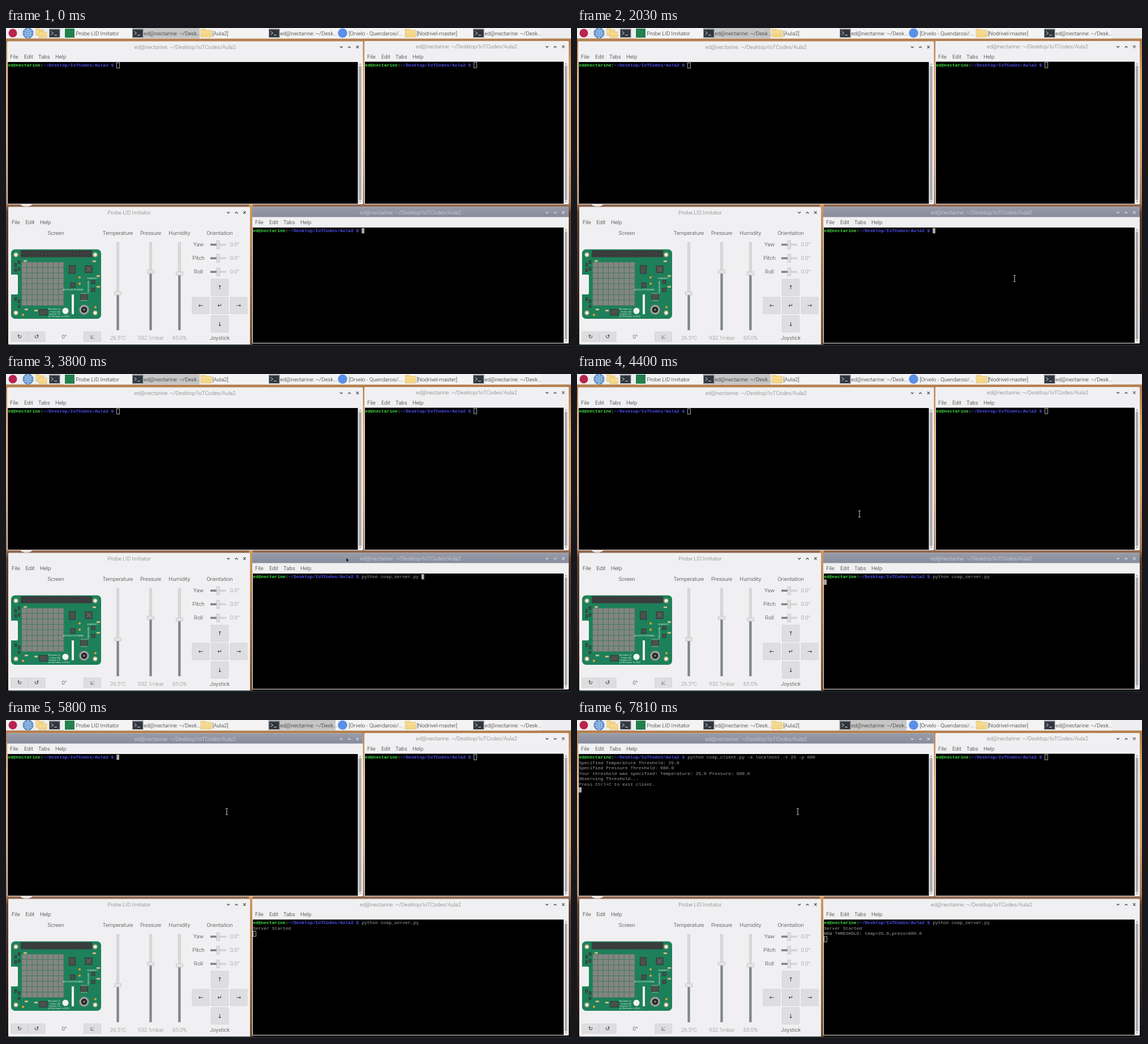
Animation, 998 px wide and 561 px high, one loop 8 s. Source, as an HTML page:

```html
<!DOCTYPE html>
<html lang="en">
<head>
<meta charset="utf-8">
<title>Terminal session</title>
<style>
  html, body { margin: 0; width: 100%; height: 100%; overflow: hidden; background: #1a1210; }
  svg { display: block; width: 998px; height: 561px; }
  text { white-space: pre; font: 300 9.6px Roboto, sans-serif; fill: #222; }
  text.mono { font: 8px "Liberation Mono", monospace; fill: #a0a0a0; }
  text.bold { font-weight: bold; }
  text.arrow { font: 10px "DejaVu Sans", sans-serif; }
  text.print { font: 4px "Liberation Sans", sans-serif; fill: #e6f2ea; }
</style>
</head>
<body>
<svg id="stage" viewBox="0 0 998 561" xmlns="http://www.w3.org/2000/svg"></svg>
<script>
const LOOP = 8000, CHAR = 4.8, LINE = 9.6, PANEL = '#f0f0f2';
const USER = 'ed@nectarine', PATH = '~/Desktop/IoTCodes/Aula2';
const TITLE = `${USER}: ${PATH}`, APP = 'Probe LID Imitator';
const PROMPT_LENGTH = USER.length + PATH.length + 4;

const rect = (x, y, w, h, fill, extra = '') =>
  `<rect x="${x}" y="${y}" width="${w}" height="${h}" fill="${fill}" ${extra}/>`;
const circle = (x, y, r, fill, extra = '') =>
  `<circle cx="${x}" cy="${y}" r="${r}" fill="${fill}" ${extra}/>`;
const path = (d, stroke, width = 1, fill = 'none') =>
  `<path d="${d}" stroke="${stroke}" stroke-width="${width}" fill="${fill}"/>`;
const text = (x, y, s, extra = '') => `<text x="${x}" y="${y}" ${extra}>${s}</text>`;
const label = (x, y, s, fill = '#333', extra = '') =>
  text(x, y, s, `text-anchor="middle" style="fill:${fill}" ${extra}`);
const repeat = (n, f) => Array.from({ length: n }, (_, i) => f(i)).join('');

// ---- Desktop and taskbar ----
const terminalIcon = x =>
  rect(x, 1, 19.5, 16, '#8b8f94') + rect(x + 1, 3, 17.5, 13, '#30363e') +
  path(`M${x + 3.5} 6l4 3-4 3M${x + 9} 12.5h5`, '#d5d9dd');
const folder = (x, y = 2, w = 19, h = 14) =>
  path(`M${x} ${y}h${w * .4}l2 2h${w * .6 - 2}v${h - 2}h${-w}z`, '#dfbd68', .7, '#f3d688') +
  path(`M${x} ${y + 5}h${w}`, '#fae9b5');

const tasks = [
  [103, APP, () => rect(104, 1, 17, 16, '#23804f')],
  [223, `${USER}: ~/Desk...`, terminalIcon],
  [344, '[Aula2]', folder],
  [464, `${USER}: ~/Desk...`, terminalIcon],
  [585, '[Orvelo - Quendarosi/...', () => circle(594.5, 9, 8.3, '#5b8fe8')],
  [705, '[Nodrivel-master]', folder],
  [825, `${USER}: ~/Desk...`, terminalIcon],
];

const taskbar = active =>
  rect(0, 0, 998, 18.5, '#eeeef0') + rect(102, 0, 843, 18.5, '#f3f3f3') +
  rect(active, 0, 119, 18.5, '#c6c6c6') +
  circle(12, 9, 7.5, '#b8244e') +
  circle(39, 9, 9, '#5f93cf', 'stroke="#3d6fae"') +
  path('M30 9h18M39 0v18M32 4q7 4 14 0M32 14q7-4 14 0M39 0q-9 9 0 18M39 0q9 9 0 18', '#c5dcf2', .8) +
  folder(53, 1, 14, 12) + folder(58, 5, 14, 12) + terminalIcon(76) +
  tasks.map(([x, name, icon]) => icon(x) + text(x + 20.3, 12.6, name)).join('');

const desktop = `
  <defs>
    <linearGradient id="sky" x2="0" y2="1">
      <stop offset="0" stop-color="#a9764a"/><stop offset=".18" stop-color="#e5a765"/>
      <stop offset=".38" stop-color="#dba069"/><stop offset=".55" stop-color="#a5785c"/>
      <stop offset=".58" stop-color="#5d4130"/><stop offset="1" stop-color="#17110f"/>
    </linearGradient>
    <linearGradient id="reflection" x2="0" y2="1">
      <stop offset="0" stop-color="#d19a60"/><stop offset="1" stop-color="#6d4c30"/>
    </linearGradient>
    <linearGradient id="active" x2="0" y2="1">
      <stop offset="0" stop-color="#999caa"/><stop offset="1" stop-color="#878b9b"/>
    </linearGradient>
  </defs>` +
  rect(0, 0, 998, 561, 'url(#sky)') +
  rect(429, 311, 7, 248, 'url(#reflection)') +
  '<ellipse cx="36" cy="311" rx="10" ry="4" fill="#e8e0da"/>' +
  rect(0, 560, 998, 1, '#12404a');

// ---- Windows ----
function windowFrame({ x, y, w, h, title, menu }, active) {
  const right = x + w, mid = y + 10, ink = active ? '#e2e3e8' : '#333';
  const b = right - 38.3, c = right - 24, d = right - 9.7;
  return rect(x, y, w, h, PANEL, 'rx="1.5"') +
    (active ? rect(x, y, w, 18, 'url(#active)') : '') +
    label(x + w / 2, y + 13.3, title, active ? '#dddee4' : '#777') +
    path(`M${b - 2.3} ${mid - 1}l2.3 2.3 2.3-2.3M${c - 2.3} ${mid + 1.5}l2.3-2.3 2.3 2.3` +
      `M${d - 2.1} ${mid - 2.1}l4.2 4.2m0-4.2l-4.2 4.2`, ink, 1.1) +
    menu.map(([dx, s]) => text(x + dx, y + 30.5, s)).join('');
}

const terminalMenu = [[5, 'File'], [30, 'Edit'], [55, 'Tabs'], [85, 'Help']];
const terminal = (x, y, w, h) => ({ x, y, w, h, title: TITLE, menu: terminalMenu });
const client = terminal(2, 23.5, 628.5, 287.5);
const spare = terminal(633, 23, 361, 288);
const server = terminal(435, 315.5, 559, 241);
const emulator = { x: 4, y: 315.5, w: 427, h: 243, title: APP,
  menu: [[6, 'File'], [30.5, 'Edit'], [56, 'Help']] };

function drawTerminal(win, active, command, output, entered) {
  const { x, y, w, h } = win, top = y + 36.5, left = x + 1.2, bar = x + w - 7.2;
  const at = n => left + n * CHAR, base = top + 8;
  const row = entered ? output.length + 1 : 0;
  const cx = at(entered ? 0 : PROMPT_LENGTH + command.length), cy = top + 1 + row * LINE;
  return windowFrame(win, active) +
    rect(x + 1, top, w - 10, h - 37.5, '#000') +
    rect(bar, top + 7, 4.5, h - 51, '#a9a9ad') +
    path(`M${bar} ${top + 5}l2.2-3 2.3 3zM${bar} ${y + h - 6}l2.2 3 2.3-3z`, 'none', 0, '#aaa') +
    text(left, base, USER, 'class="mono bold" style="fill:#42e342"') +
    text(at(USER.length), base, ':', 'class="mono bold" style="fill:#ccc"') +
    text(at(USER.length + 1), base, `${PATH} $`, 'class="mono bold" style="fill:#4b51ee"') +
    text(at(PROMPT_LENGTH), base, command, 'class="mono"') +
    output.map((s, i) => text(left, base + (i + 1) * LINE, s, 'class="mono"')).join('') +
    (active ? rect(cx, cy, 4.8, 9.3, '#aaa')
            : rect(cx + .3, cy + .3, 5, 9.4, 'none', 'stroke="#bbb" stroke-width=".9"'));
}

// ---- Emulator panel ----
const button = (cx, cy, w, h, glyph) =>
  rect(cx - w / 2, cy - h / 2, w, h, '#dedee0', 'stroke="#cfcfd1" stroke-width=".8"') +
  label(cx, cy + 3.6, glyph, '#333', 'class="arrow"');

const slider = (x, name, value, y) =>
  label(x, 365, name) +
  rect(x - 2, 378, 4, 155, '#d9d9d9', 'stroke="#c2c2c2" stroke-width=".6"') +
  rect(x - 2, y, 4, 533 - y, '#7d868e') +
  rect(x - 6, y - 3, 12, 6, '#e4e4e4', 'stroke="#bdbdbd" stroke-width=".7"') +
  label(x + .5, 550, value, '#888');

const dial = (name, y) =>
  label(340, y + 3.4, name) +
  rect(361, y - 1.5, 28, 3.5, '#d3d3d3') + rect(361, y - 1.5, 14, 3.5, '#7d868e') +
  rect(372, y - 7, 5.5, 14.5, '#dedede', 'stroke="#c0c0c0" stroke-width=".7"') +
  label(404, y + 3.4, '0.0°', '#888');

const chip = (x, y, w, h) => rect(x - w / 2, y - h / 2, w, h, '#4b504e', 'stroke="#2d3532"');
const board =
  rect(9, 390.5, 159, 122.5, '#1d805a', 'rx="7"') +
  rect(8, 435, 13, 35, PANEL, 'rx="2"') +
  rect(26, 392, 126, 12.5, '#393d3c') +
  repeat(40, i => circle(29.5 + (i % 20) * 6.3, i < 20 ? 395.3 : 401.2, 1.4, '#111', 'stroke="#777" stroke-width=".5"')) +
  [[17.5, 400], [157.5, 400], [17.5, 502.5], [157.5, 502.5]].map(([x, y]) =>
    circle(x, y, 3.4, PANEL, 'stroke="#b9ad78" stroke-width="1.6"')).join('') +
  rect(27.5, 413, 75, 77, '#4c7c65') +
  repeat(64, i => rect(28.2 + (i % 8) * 9.3, 413.5 + (i >> 3) * 9.6, 8, 8.3, '#858583')) +
  [[117, 426, 11, 14], [146, 425.5, 12, 12], [118, 453.5, 8, 8], [154, 448, 6, 6], [154, 462, 6, 6],
   [138, 474.5, 12, 10], [66, 501.5, 14, 10], [17, 418, 3, 5], [23, 413, 3, 5], [17, 427, 3, 5],
   [23, 425, 3, 5], [17, 478, 3, 5], [23, 482, 3, 5], [23, 491, 3, 4]].map(c => chip(...c)).join('') +
  repeat(4, i => rect(132.7 + i * 3, 467.5, 1.2, 2, '#ccc') + rect(132.7 + i * 3, 479.5, 1.2, 2, '#ccc')) +
  path('M142 421.5l8 8m0-8l-8 8', '#777') +
  [[130, 440], [130, 451], [158, 492.5], [30, 506]].map(([x, y]) => circle(x, y, 2, '#f0a030')).join('') +
  [[31, 409.5], [153, 410], [160, 436], [160, 455], [33, 495], [50, 497]].map(([x, y]) => rect(x, y, 6, 3, '#c8b98a')).join('') +
  rect(116, 470, 4, 35, '#f2f2f2') +
  circle(138, 497, 8.5, '#a9adab', 'stroke="#70807a" stroke-width="2" stroke-dasharray="3 2"') +
  circle(138, 497, 5.5, '#252827') + circle(138, 497, 2, '#777') +
  circle(105, 499, 5.5, '#f4f4f4') +
  label(153, 443.3, 'HUMIDITY', '#e6f2ea', 'class="print"') +
  label(119, 463, 'ACCEL/GYRO/MAG', '#e6f2ea', 'class="print"') +
  text(147, 468, 'PRESSURE', 'class="print" transform="rotate(-90 147 468)"') +
  ['Nectarine Io', 'Probe LID', 'Version 1.0', '(c) Nectarine Io 2015'].map((s, i) =>
    text(i < 3 ? 96 : 112, 497.3 + i * 4.2, s, 'class="print" text-anchor="end"')).join('');

const emulatorPanel =
  windowFrame(emulator, false) + label(88, 365, 'Screen') + board +
  slider(197.5, 'Temperature', '26.5°C', 468) +
  slider(255.5, 'Pressure', '932.1mbar', 430) +
  slider(306.3, 'Humidity', '65.0%', 433) +
  label(377.5, 365, 'Orientation') +
  dial('Yaw', 382) + dial('Pitch', 406) + dial('Roll', 430) +
  button(377.5, 457.5, 30, 29, '↑') + button(344, 489.5, 30, 29, '←') +
  button(377.5, 489.5, 30, 29, '↵') + button(411, 489.5, 30, 29, '→') +
  button(377.5, 522, 30, 29, '↓') + label(377.5, 550, 'Joystick') +
  button(24, 544.5, 30, 17, '↻') + button(54, 544.5, 30, 17, '↺') +
  label(103, 548, '0°') + button(152.5, 544.5, 30, 17, '') +
  path('M155 541.5l-5 6h6M150 542v5.5', '#666', .8);

// ---- Pointer ----
const shapes = {
  hand: path('M-1.6 1q1.2-2 2.3 0l1 4.2 5 .8q1.6.6 1.3 2.4l-1 5.2h-5.2l-4.6-4.6q-.8-1.7 1-1.6l1.7.9z', '#555', .5, '#fff'),
  beam: path('M-2-5.5h1.5l.5.5.5-.5h1.5M-2 5.5h1.5l.5-.5.5.5h1.5M0-5v10', '#d8d8d8', 1),
  arrow: path('M0 0v8l1.9-1.7 1.3 3 1.4-.6-1.3-2.9h2.6z', '#ddd', .5, '#111'),
};
// time, x, y, easing exponent towards that point
const route = [
  [370, 814, 566, 1], [1070, 773, 444, 1.6], [1170, 773, 443, 1], [1200, 773, 442, 1],
  [2030, 773, 442, 1], [2550, 743, 411.5, 1.3], [2860, 743, 411.5, 1], [3660, 633, 341, 1],
  [3800, 601, 324, 1], [4400, 499, 247, 1.2], [4500, 499, 247, 1], [5100, 399, 168, 1.2],
  [5340, 390, 161.5, 1.4],
];
function pointer(t) {
  if (t < route[0][0]) return '';
  const i = route.findIndex(p => p[0] > t);
  let [, x, y] = route[route.length - 1];
  if (i > 0) {
    const [t0, x0, y0] = route[i - 1], [t1, x1, y1, ease] = route[i];
    const k = 1 - (1 - (t - t0) / (t1 - t0)) ** ease;
    x = x0 + (x1 - x0) * k;
    y = y0 + (y1 - y0) * k;
  }
  const shape = t < 1190 ? 'hand' : y > 310 && y < 351 ? 'arrow' : 'beam';
  return `<g transform="translate(${x.toFixed(1)} ${y.toFixed(1)})">${shapes[shape]}</g>`;
}

// ---- Session script ----
const typed = (s, t, start, step) => s.slice(0, Math.max(0, Math.floor((t - start) / step) + 1));
const shownBy = (t, lines) => lines.filter(([start]) => t >= start).map(([, s]) => s);

const serverLines = [[4550, 'Server Started'], [7600, 'NEW THRESHOLD: temp=25.0,press=600.0']];
const clientLines = [
  [7490, 'Specified Temperature Threshold: 25.0'],
  [7490, 'Specified Pressure Threshold: 600.0'],
  [7700, 'Your threshold was specified! Temperature: 25.0 Pressure: 600.0'],
  [7700, 'Observing Threshold...'],
  [7700, 'Press Ctrl+C to exit client.'],
];
const serverCommand = t =>
  t < 2860 ? typed('clear', t, 2150, 70) : t < 3300 ? '' : 'python coap_server.py ';
const clientCommand = t =>
  t < 5900 ? '' : t < 6360 ? 'clear' : t < 6690 ? '' : 'python coap_client.py -a localhost -t 25 -p 600';

function screens(t) {
  const clientActive = t >= 5690;
  return taskbar(clientActive ? 463 : 223) +
    drawTerminal(client, clientActive, clientCommand(t), shownBy(t, clientLines), t >= 7150) +
    drawTerminal(server, !clientActive, serverCommand(t), shownBy(t, serverLines), t >= 4300);
}

const stage = document.getElementById('stage');
stage.innerHTML = desktop + drawTerminal(spare, false, '', [], false) + emulatorPanel +
  '<g id="screens"></g><g id="pointer"></g>';

const shown = {};
function update(id, markup) {
  if (shown[id] === markup) return;
  shown[id] = markup;
  document.getElementById(id).innerHTML = markup;
}

const begin = performance.now();
function frame() {
  const t = (performance.now() - begin) % LOOP;
  update('screens', screens(t));
  update('pointer', pointer(t));
  requestAnimationFrame(frame);
}
frame();
</script>
</body>
</html>
```
